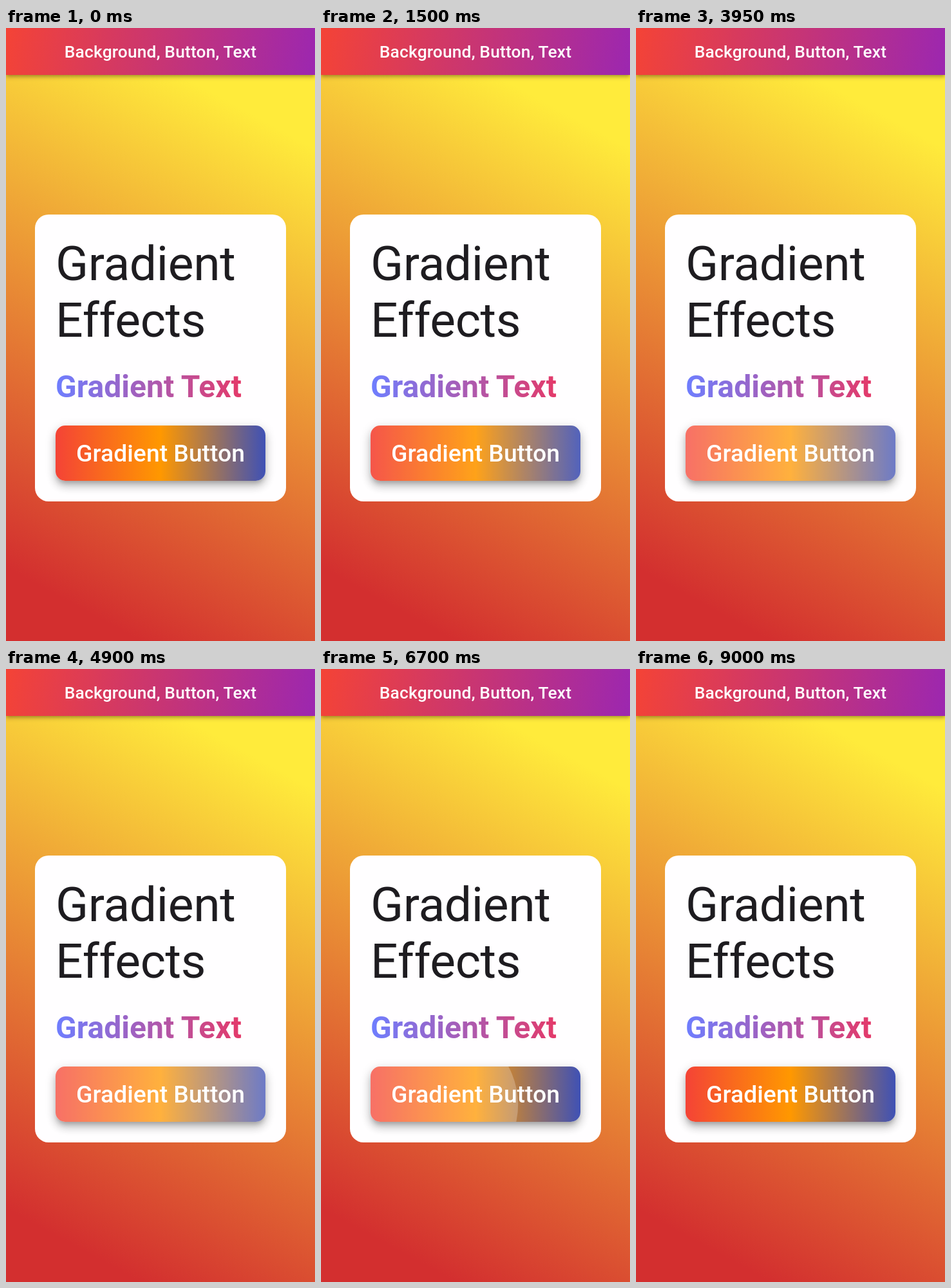
An HTML page that plays this animation: 480x953 px, repeating every 9.05 s.

```html
<!DOCTYPE html>
<html lang="en">
<head>
<meta charset="utf-8">
<title>Gradient Effects</title>
<style>
  html, body { margin: 0; width: 100%; height: 100%; overflow: hidden; }
  #stage {
    position: relative; width: 480px; height: 953px; overflow: hidden;
    font-family: Roboto, sans-serif;
  }
  #stage > * { position: absolute; }
  #body {
    left: 0; top: 73px; width: 480px; height: 880px;
    background: linear-gradient(208.6deg, #ffeb3b 10%, #d32f2f 90%);
  }
  #bar {
    left: 0; top: 0; width: 480px; height: 73px;
    background: linear-gradient(98.65deg, #f44336, #9c27b0);
    box-shadow: 0 2px 5px -1px rgba(0,0,0,.2), 0 4px 6px rgba(0,0,0,.14), 0 1px 10px rgba(0,0,0,.12);
  }
  #card {
    left: 45px; top: 290px; width: 390px; height: 446px;
    border-radius: 21px; background: #fffeff;
  }
  #button {
    left: 77px; top: 618px; width: 326px; height: 86px;
    border-radius: 15px; overflow: hidden;
    background: linear-gradient(90deg, #f44336, #ff9800, #3f51b5);
    box-shadow: 0 6px 7px -3px rgba(0,0,0,.2), 0 9px 13px 1px rgba(0,0,0,.14), 0 4px 16px 2px rgba(0,0,0,.12);
  }
  #stage > svg { left: 0; top: 0; }
  #button svg { display: block; }
</style>
</head>
<body>
<div id="stage">
  <div id="body"></div>
  <div id="bar"></div>
  <div id="card"></div>
  <div id="button">
    <svg width="326" height="86" viewBox="77 618 326 86"><g id="ripples" fill="#fff"></g></svg>
  </div>
  <svg width="480" height="953">
    <defs>
      <linearGradient id="ink" gradientUnits="userSpaceOnUse" x1="77" y1="0" x2="368" y2="0">
        <stop stop-color="#6e7eff"/>
        <stop offset="1" stop-color="#e53968"/>
      </linearGradient>
    </defs>
    <text x="240" y="46" text-anchor="middle" font-size="26.3" font-weight="500" letter-spacing=".2" fill="#fff">Background, Button, Text</text>
    <g font-size="75" letter-spacing="-.33" fill="#1e1c20">
      <text x="77" y="391.5">Gradient</text>
      <text x="77" y="479.5">Effects</text>
    </g>
    <text x="77" y="574" font-size="48" font-weight="700" fill="url(#ink)">Gradient Text</text>
    <text x="240" y="674" text-anchor="middle" font-size="37.3" font-weight="500" fill="#fff">Gradient Button</text>
  </svg>
</div>
<script>
const LOOP = 9050;
const CENTER = { x: 240, y: 661 };
const REACH = Math.hypot(326, 86) / 2;
const FADE_IN = 75, HOLD_GROW = 1000, TAP_GROW = 225, FADE_OUT = 150;

const presses = [
  { x: 250, y: 672, down: 500, up: 1188 },
  { x: 342, y: 654.6, down: 3170, up: 5000 },
  { x: 100, y: 700, down: 6360, up: 8100 }
];

const clamp = v => Math.min(1, Math.max(0, v));
const lerp = (a, b, k) => a + (b - a) * k;
const bezier = (a, b, u) => 3 * a * u * (1 - u) ** 2 + 3 * b * u * u * (1 - u) + u ** 3;

// cubic-bezier(.25, .1, .25, 1), solved by bisection
function ease(x) {
  let lo = 0, hi = 1;
  for (let i = 0; i < 24; i++) {
    const mid = (lo + hi) / 2;
    if (bezier(.25, .25, mid) < x) lo = mid; else hi = mid;
  }
  return bezier(.1, 1, lo);
}

const group = document.getElementById('ripples');
for (const press of presses) {
  press.node = document.createElementNS('http://www.w3.org/2000/svg', 'circle');
  group.append(press.node);
}

function set(node, attrs) {
  for (const name in attrs) node.setAttribute(name, attrs[name]);
}

// A held ripple grows slowly; release finishes it quickly, then it fades.
function draw(t) {
  for (const { x, y, down, up, node } of presses) {
    const held = Math.max(0, Math.min(t, up) - down) / HOLD_GROW;
    const released = Math.max(0, t - up);
    const k = ease(clamp(held + released / TAP_GROW));
    const alpha = .24 * clamp((t - down) / FADE_IN) * clamp(1 - (released - TAP_GROW) / FADE_OUT);
    set(node, {
      cx: lerp(x, CENTER.x, k),
      cy: lerp(y, CENTER.y, k),
      r: lerp(REACH * .3, REACH + 6, k),
      'fill-opacity': alpha
    });
  }
}

const start = performance.now();
function tick() {
  draw((performance.now() - start) % LOOP);
  requestAnimationFrame(tick);
}
tick();
</script>
</body>
</html>
```
